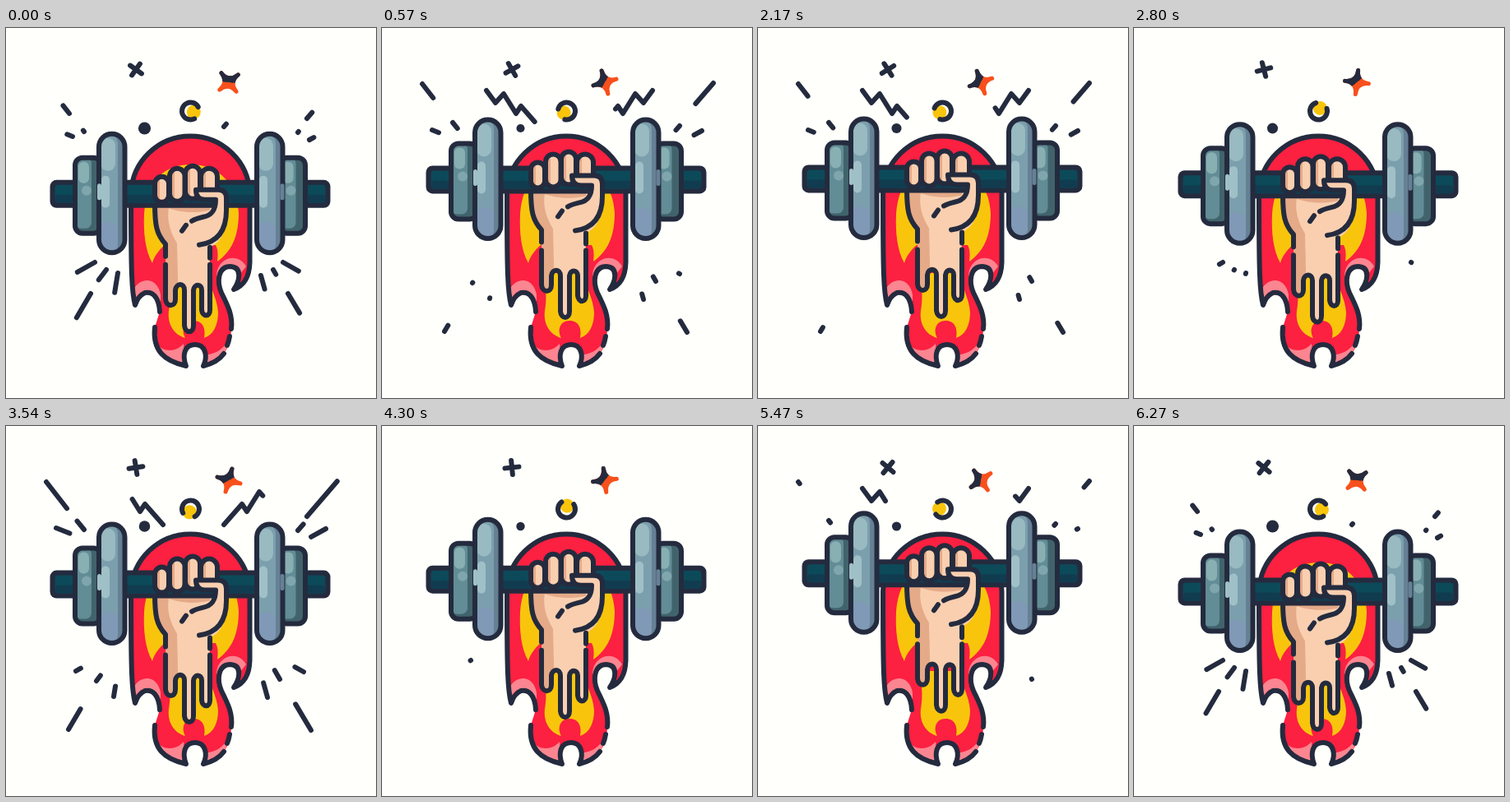
Recreate the animation shown at these times as an HTML page with a canvas. Size 450x450 px, loop 6.3 s.

```html
<!DOCTYPE html>
<html>
<head>
<meta charset="utf-8">
<style>
html, body { margin: 0; width: 100%; height: 100%; overflow: hidden; background: #fffffb; }
canvas { display: block; width: 100vw; height: 100vh; }
</style>
</head>
<body>
<canvas id="stage"></canvas>
<script>
const canvas = document.getElementById('stage');
const ctx = canvas.getContext('2d');
const SIZE = 450, LOOP = 6300, BEAT = LOOP / 4, PULSE = LOOP / 5;
const INK = '#242b3e', RED = '#fc2041', YELLOW = '#f8c50c', PINK = '#fb8590';
const SKIN = '#f9cfb0', SHADE = '#e5aa88', LINE = 6, TAU = Math.PI * 2;

const clamp = v => Math.max(0, Math.min(1, v));
const mod1 = v => ((v % 1) + 1) % 1;

function fill(d, color) {
  ctx.fillStyle = color;
  ctx.fill(new Path2D(d));
}

function stroke(d, width = LINE, color = INK) {
  ctx.strokeStyle = color;
  ctx.lineWidth = width;
  ctx.stroke(new Path2D(d));
}

function box(x, y, w, h, r, color) {
  ctx.beginPath();
  ctx.roundRect(x, y, w, h, r);
  ctx.fillStyle = color;
  ctx.fill();
}

// Rounded box whose inside is painted by a callback, then outlined.
function panel(x, y, w, h, r, paint) {
  const shape = new Path2D();
  shape.roundRect(x, y, w, h, r);
  ctx.save();
  ctx.clip(shape);
  paint();
  ctx.restore();
  ctx.strokeStyle = INK;
  ctx.lineWidth = LINE;
  ctx.stroke(shape);
}

function disc(x, y, r, color) {
  ctx.beginPath();
  ctx.arc(x, y, r, 0, TAU);
  ctx.fillStyle = color;
  ctx.fill();
}

function at(x, y, angle, draw) {
  ctx.save();
  ctx.translate(x, y);
  ctx.rotate(angle);
  draw();
  ctx.restore();
}

// Strokes the part of a polyline between two shares of its length.
function trim(pts, tail, head) {
  if (head <= 0 || tail >= 1) return;
  let len = 0;
  ctx.beginPath();
  pts.forEach(([x, y], i) => {
    if (i) len += Math.hypot(x - pts[i - 1][0], y - pts[i - 1][1]);
    ctx.lineTo(x, y);
  });
  ctx.strokeStyle = INK;
  ctx.lineWidth = LINE;
  ctx.setLineDash([Math.max(0.1, (head - tail) * len), len * 2]);
  ctx.lineDashOffset = -tail * len;
  ctx.stroke();
  ctx.setLineDash([]);
}

// x0, y0, x1, y1, start phase; each ray runs outward
const upperRays = [
  [77, 104, 49, 68, .92], [81, 132, 61, 124, .9], [95, 126, 86, 115, .965],
  [366, 110, 403, 67, .95], [369, 136, 389, 125, .92], [355, 127, 362, 119, .965]
];
const lowerRays = [
  [103, 323, 76, 369, .81], [108, 285, 85, 298, .725], [122, 294, 110, 310, .77],
  [136, 298, 131, 329, .77], [343, 323, 371, 370, .85], [337, 285, 362, 299, .775],
  [310, 301, 318, 330, .83], [325, 294, 333, 308, .88]
];
const boltRight = [[265, 120], [287, 95], [293, 104], [308, 80], [318, 91], [329, 76]];
const boltLeft = boltRight.map(([x, y]) => [456 - x, y]);

function rays(list, p, tailTime) {
  for (const [x0, y0, x1, y1, start] of list) {
    const k = mod1(p - start);
    trim([[x0, y0], [x1, y1]], clamp((k - .3) / tailTime), clamp(k / .3));
  }
}

function bolt(pts, p, start) {
  const k = mod1(p - start);
  trim(pts, clamp((k - .335) / .23), clamp(k / .35) ** 1.4);
}

function ornaments(t, p, lift) {
  at(158, 50.5, (.73 - p) * Math.PI - .1, () => stroke('M-8.5 0H8.5M0-8.5V8.5', 6));

  at(271, 66, (1 - lift) * Math.PI / 2 + .12 + Math.PI / 4, () => {
    const star = 'M0-14.5Q0 0 14.5 0Q0 0 0 14.5Q0 0-14.5 0Q0 0 0-14.5Z';
    const paint = color => {
      fill(star, color);
      stroke(star, 5, color);
    };
    paint('#f8501c');
    ctx.clip(new Path2D('M-24-24L24 24L-30 50L-50-30Z'));
    paint(INK);
  });

  at(224.5, 101, p * TAU + .3, () => {
    disc(4, 0, 8.5, YELLOW);
    ctx.beginPath();
    ctx.arc(0, 0, 10.5, .8, TAU - .8);
    ctx.strokeStyle = INK;
    ctx.lineWidth = LINE;
    ctx.stroke();
  });

  disc(168.5, 122, 6.3 + 1.3 * Math.cos(t / PULSE * TAU), INK);
}

const upperEdge = `M187 345C186 327 178 320 169 322C162 325 159 331 157 337
  C153 322 152 300 152 201A72.3 72.3 0 0 1 296.5 201V285C296 305 288 314 277 318
  C284 308 288 291 273 290C258 290 256 308 262 322C270 338 276 350 274 366`;
const lowerEdge = `M181 364C178 392 192 405 219 411C214 398 217 385 230 385
  C242 385 246 398 240 411C252 408 260 403 265 396`;
const flame = upperEdge + 'C273 392 262 406 240 411C246 398 242 385 230 385C217 385 214 398 219 411C192 405 178 392 181 364Z';

function fire() {
  fill(flame, RED);
  ctx.save();
  ctx.clip(new Path2D(flame));
  fill(`M178 286C169 270 167 248 168 226C171 185 193 166 225 166C257 166 281 188 283 225
    C283 254 274 272 257 284C258 276 258 270 255 264H193C186 270 180 278 178 286Z`, YELLOW);
  fill(`M196 298H246C247 315 257 328 258 346C258 360 253 373 241 377
    C243 366 240 356 228 356C216 356 213 368 218 377C204 373 196 360 198 344
    C201 328 199 312 196 298Z`, YELLOW);
  fill('M155 318C164 302 184 303 188 324L188 348C184 326 174 316 160 330Z', PINK);
  fill('M256 300C258 278 283 273 292 290L284 300C278 284 262 286 260 308Z', PINK);
  fill('M181 382C192 396 207 394 216 384L218 412L190 404Z', PINK);
  fill('M244 397C255 397 266 389 272 378L264 402L238 414Z', PINK);
  ctx.restore();
  stroke(upperEdge);
  stroke(lowerEdge);
  stroke('M272 375Q271 381 269 386');
}

function outerPlate(x) {
  panel(x, 158, 31.5, 92, 9, () => {
    box(x, 158, 32, 92, 0, '#41636c');
    box(x, 158, 20, 86, 7, '#628c96');
    box(x + 4, 163, 13, 26, 6, '#88afb2');
    disc(x + 14, 198, 6, '#80a6ad');
  });
}

function bigPlate(x) {
  panel(x, 129, 31.5, 144.5, 15.7, () => {
    box(x, 129, 32, 145, 0, '#668094');
    box(x, 129, 23, 138, 12, '#7b9fad');
    box(x + 2, 134, 18, 40, 9, '#98bac0');
    box(x + 3, 180, 10, 39, 5, '#a0c0c7');
    box(x, 236, 23, 38, 10, '#8099b6');
  });
}

function dumbbell() {
  box(53.5, 185, 341, 34, 8, INK);
  box(59.5, 191, 329, 22, 4, '#0c4a5a');
  box(59.5, 203, 329, 10, 4, '#113c50');
  outerPlate(84);
  outerPlate(332.5);
  bigPlate(113);
  bigPlate(305);
  stroke('M113.5 192V207', 5, '#a0c0c7');
  stroke('M336 192V207', 5, '#668094');
}

const arm = `M180 205C180 232 181 249 194 262V330C195 340 206 340 206 330V319
  C207 310 217 310 217 319V362C218 372 228 372 228 362V319C229 311 238 311 238 319V343
  C239 352 248 352 248 343V267C264 259 268 246 268 220V197L240 192Z`;

function palm() {
  fill(arm, SKIN);
  ctx.save();
  ctx.clip(new Path2D(arm));
  fill('M176 205H202C194 225 196 242 208 262L210 345H190V260Q176 245 176 205Z', SHADE);
  fill('M176 205H248V222C224 227 207 223 194 218Z', SHADE);
  ctx.restore();
  stroke(`M181 214C181 240 183 251 194 263V278M194 288V330C195 340 206 340 206 330V319
    C207 310 217 310 217 319V362C218 372 228 372 228 362V319C229 311 238 311 238 319V343
    C239 352 248 352 248 343V288M248 280V267`);
}

function finger(x, y, w, bottom) {
  panel(x, y, w, bottom - y, w / 2, () => {
    box(x, y, w, bottom - y, 0, SKIN);
    box(x, y, 6, bottom - y, 0, SHADE);
  });
}

function fingers() {
  finger(181, 181, 17, 212);
  finger(199, 171, 18.5, 211);
  finger(218, 168, 18, 208);
  finger(237, 171, 20, 206);
  fill('M232 197H258Q268 197 268 207V232L252 228L254 209H240Q230 207 232 197Z', SKIN);
  stroke('M235 264C257 261 268 247 268 222V207Q268 197 258 197H231Q231 209 242 209H255C255 222 250 228 240 230Q231 232 226 235');
  stroke('M214 247L219 240');
}

function draw(t) {
  const p = t / BEAT % 1;
  const lift = (1 - Math.cos((p - .03) * TAU)) / 2;
  ctx.setTransform(canvas.width / SIZE, 0, 0, canvas.height / SIZE, 0, 0);
  ctx.fillStyle = '#fffffb';
  ctx.fillRect(0, 0, SIZE, SIZE);
  ctx.lineCap = ctx.lineJoin = 'round';

  rays(upperRays, p, .27);
  rays(lowerRays, p, .3);
  bolt(boltRight, p, .965);
  bolt(boltLeft, p, .01);
  ornaments(t, p, lift);
  fire();
  ctx.save();
  ctx.translate(0, -23.5 * lift);
  palm();
  dumbbell();
  fingers();
  ctx.restore();
}

function resize() {
  const ratio = window.devicePixelRatio || 1;
  canvas.width = Math.round(innerWidth * ratio);
  canvas.height = Math.round(innerHeight * ratio);
}

resize();
addEventListener('resize', resize);
const begin = performance.now();
function frame() {
  draw((performance.now() - begin) % LOOP);
  requestAnimationFrame(frame);
}
frame();
</script>
</body>
</html>
```
